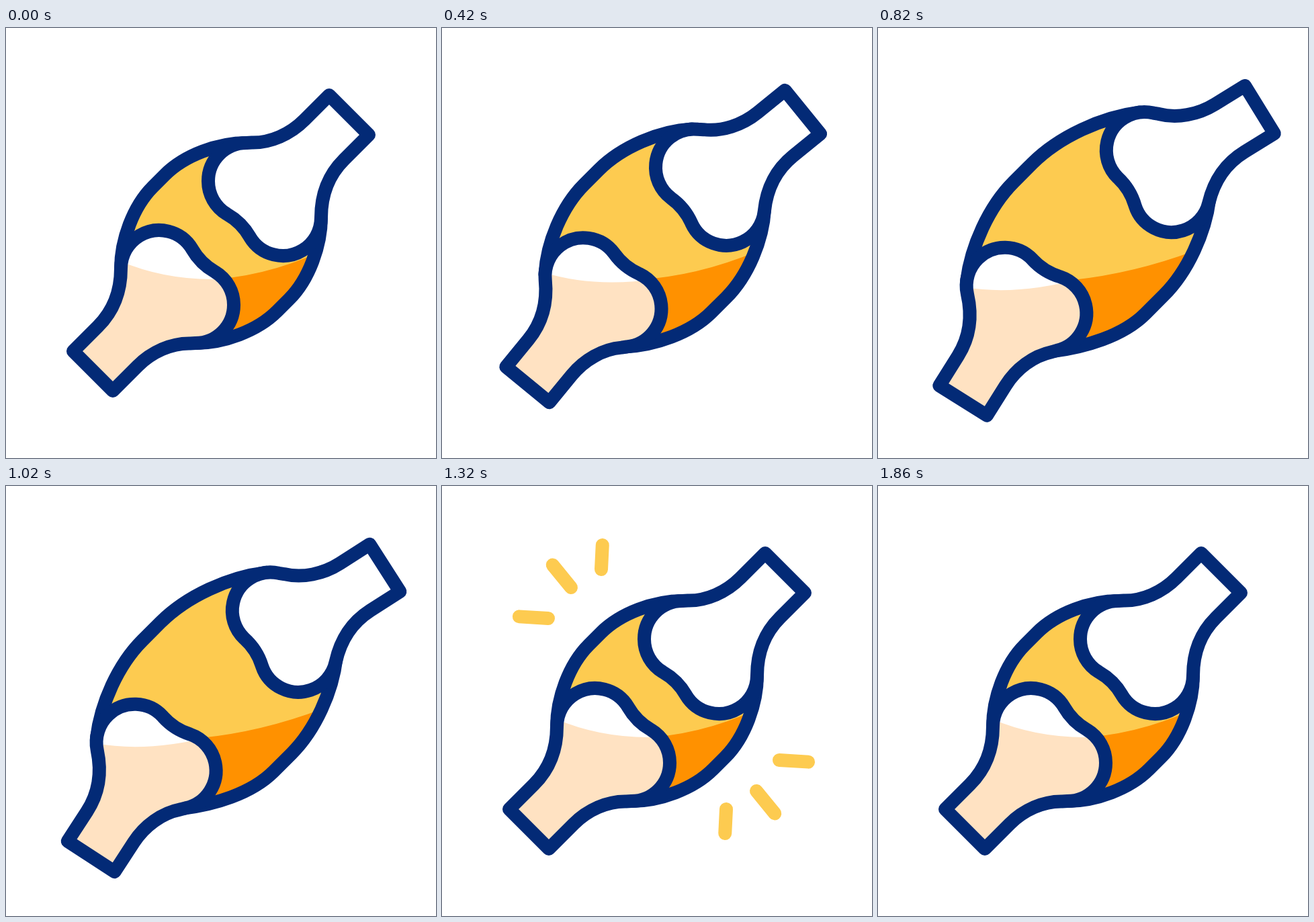
Recreate the animation shown at these times as an HTML page with a canvas. Size 640x640 px, loop 2400 ms.

```html
<!DOCTYPE html>
<html lang="en">
<head>
<meta charset="utf-8">
<title>Joint</title>
<style>
html, body { margin: 0; width: 100%; height: 100%; overflow: hidden; background: #fff; }
canvas { display: block; width: 100vmin; height: 100vmin; }
</style>
</head>
<body>
<canvas width="640" height="640"></canvas>
<script>
const canvas = document.querySelector('canvas');
const ctx = canvas.getContext('2d');
const NAVY = '#032a76', YELLOW = '#fdcb50', ORANGE = '#ff9100', SKIN = '#ffe2c2';
const LOOP = 2400, HEAD = 57, RAD = Math.PI / 180;

const ease = x => { x = Math.min(1, Math.max(0, x)); return x * x * (3 - 2 * x); };
const pulse = (t, from, peak, to) =>
  t < peak ? ease((t - from) / (peak - from)) : ease((to - t) / (to - peak));

// Upper bone around the middle of its two round heads; the lower one is turned by 180 degrees.
const bone = new Path2D();
bone.moveTo(96, -155);
bone.lineTo(59, -118);
bone.bezierCurveTo(38, -97, 9, -84, -19, -84.5);
bone.arc(-27, -27, HEAD, -90 * RAD, 121 * RAD, true);
bone.bezierCurveTo(-42, 30, -30, 42, -22, 56);
bone.arc(27, 27, HEAD, 149 * RAD, 0, true);
bone.bezierCurveTo(84, -9, 97, -38, 118, -59);
bone.lineTo(155, -96);
bone.closePath();

// Inner and outer ends of the upper sparks; the lower ones are mirrored.
const sparks = [[237, 124, 239, 83], [192, 151, 161, 113], [158, 197, 109, 194]];

function placeBone(x, y, angle) {
  const matrix = new DOMMatrix().translate(x, y).rotate(angle);
  const path = new Path2D();
  path.addPath(bone, matrix);
  return { x, path, at: (x, y) => matrix.transformPoint({ x, y }) };
}

// Point on the rim of a head, with the clockwise direction of the rim there.
function rim(center, angle) {
  const dx = Math.cos(angle * RAD), dy = Math.sin(angle * RAD);
  return { x: center.x + HEAD * dx, y: center.y + HEAD * dy, dx: -dy, dy: dx };
}

function curve(path, a, b) {
  const k = 0.32 * Math.hypot(b.x - a.x, b.y - a.y);
  path.bezierCurveTo(a.x + k * a.dx, a.y + k * a.dy, b.x - k * b.dx, b.y - k * b.dy, b.x, b.y);
}

// Leaves one head along its rim, runs straight past the middle and meets the other head.
function addWall(path, from, to, middle, half, side) {
  const d = side * Math.SQRT1_2;
  const point = s => ({ x: middle + s * side, y: middle - s * side, dx: d, dy: -d });
  path.lineTo(from.x, from.y);
  curve(path, from, point(-half));
  path.lineTo(point(half).x, point(half).y);
  curve(path, point(half), to);
}

function fill(path, color) {
  ctx.fillStyle = color;
  ctx.fill(path);
}

// Fills what lies below a quadratic curve, inside the given shape.
function fillBelow(shape, x1, y1, cx, cy, x2, y2, color) {
  const area = new Path2D();
  area.moveTo(0, y1);
  area.lineTo(x1, y1);
  area.quadraticCurveTo(cx, cy, x2, y2);
  area.lineTo(640, y2);
  area.lineTo(640, 640);
  area.lineTo(0, 640);
  ctx.save();
  ctx.clip(shape);
  fill(area, color);
  ctx.restore();
}

function drawSparks(t) {
  const end = ease((t - 1180) / 180), start = ease((t - 1320) / 180);
  if (end <= start) return;
  ctx.strokeStyle = YELLOW;
  ctx.beginPath();
  for (const [x, y, u, v] of sparks) {
    const at = k => [x + (u - x) * k, y + (v - y) * k];
    const [a, b] = at(start), [c, d] = at(end);
    ctx.moveTo(a, b);
    ctx.lineTo(c, d);
    ctx.moveTo(660 - a, 605 - b);
    ctx.lineTo(660 - c, 605 - d);
  }
  ctx.stroke();
}

function draw(t) {
  const bend = pulse(t, 0, 940, 1320), pull = pulse(t, 1320, 1580, 1860);
  const upper = placeBone(385 + 33.3 * bend + 13.5 * pull, 255 - 42.3 * bend - 11 * pull, 14 * bend);
  const lower = placeBone(255 - 35.6 * bend - 16.2 * pull, 385 + 20 * bend + 13.8 * pull, 180 - 13.5 * bend);

  const lean = 7.5 * bend, half = 9 + 5 * bend;
  const capsule = new Path2D();
  addWall(capsule, rim(lower.at(27, 27), 180 + lean), rim(upper.at(-27, -27), 270 - lean),
    227.5 - 12.5 * bend - pull, half, 1);
  addWall(capsule, rim(upper.at(27, 27), lean), rim(lower.at(-27, -27), 90 - lean),
    412.5 - bend, half, -1);
  capsule.closePath();

  ctx.fillStyle = '#fff';
  ctx.fillRect(0, 0, 640, 640);
  ctx.lineWidth = 20;
  ctx.lineCap = ctx.lineJoin = 'round';
  ctx.strokeStyle = NAVY;

  fill(capsule, YELLOW);
  fillBelow(capsule, 290, 375, 380, 373 - 8 * bend, 470, 332 - 9 * pull, ORANGE);
  ctx.stroke(capsule);
  fill(upper.path, '#fff');
  fill(lower.path, '#fff');
  const level = 373, shore = lower.at(85, 38), right = lower.x + 80;
  fillBelow(lower.path, shore.x, shore.y,
    (shore.x + right) / 2 - 7, (shore.y + level) / 2 + 19, right, level, SKIN);
  ctx.stroke(upper.path);
  ctx.stroke(lower.path);
  drawSparks(t);
}

function frame() {
  draw(performance.now() % LOOP);
  requestAnimationFrame(frame);
}
frame();
</script>
</body>
</html>
```
